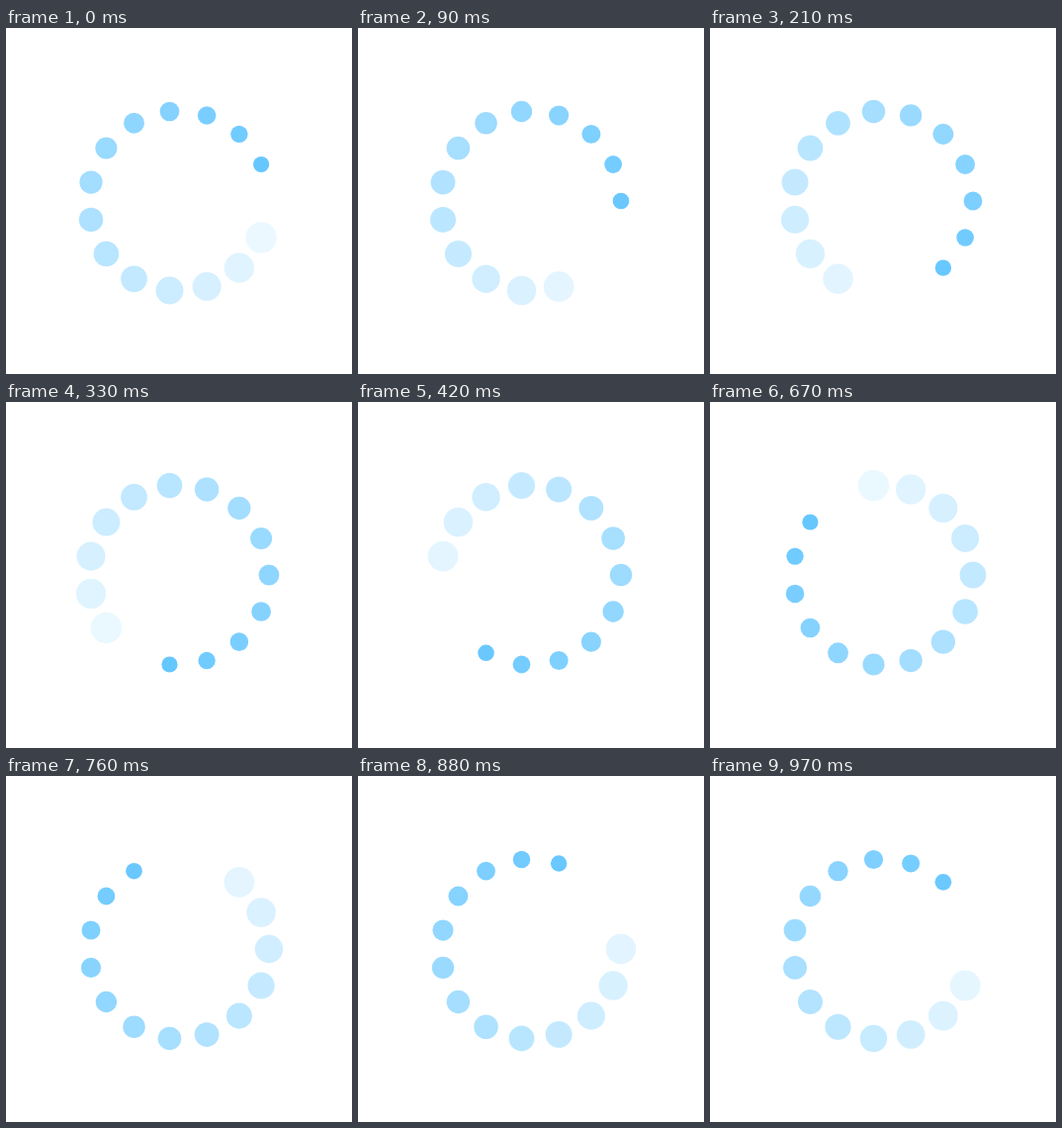
Animation, 350 px wide and 350 px high, one loop 1000 ms. Source, as an HTML page with a canvas:

```html
<!DOCTYPE html>
<html>
<head>
<meta charset="utf-8">
<style>
html, body { margin: 0; width: 100%; height: 100%; overflow: hidden; background: #fff; }
canvas { display: block; }
</style>
</head>
<body>
<canvas id="stage" width="350" height="350"></canvas>
<script>
const ctx = document.getElementById('stage').getContext('2d');
const DOTS = 15, STEPS = 33, LOOP = 1000, RING = 91, CENTER = 175;
const MIN_ALPHA = 0.128; // fainter dots are not shown

// 30 ms steps; one step in the middle lasts 40 ms
function stepAt(ms) {
  return Math.floor((ms < 510 ? ms : ms - 10) / 30);
}

function draw(ms) {
  const turn = stepAt(ms) / STEPS;
  ctx.clearRect(0, 0, 350, 350);
  ctx.fillStyle = '#66c7ff';
  for (let i = 0; i < DOTS; i++) {
    // age runs from 0 (small, solid) to 1 (large, faded)
    const age = (turn + 1 - (i + 1) / DOTS + 1e-6) % 1;
    const alpha = 1 - age;
    if (alpha < MIN_ALPHA) continue;
    const angle = i * 2 * Math.PI / DOTS;
    ctx.globalAlpha = alpha;
    ctx.beginPath();
    ctx.arc(CENTER + RING * Math.cos(angle), CENTER + RING * Math.sin(angle),
            8.1 + 8.8 * age, 0, 2 * Math.PI);
    ctx.fill();
  }
}

const start = performance.now();
function tick() {
  draw((performance.now() - start) % LOOP);
  requestAnimationFrame(tick);
}
tick();
</script>
</body>
</html>
```
